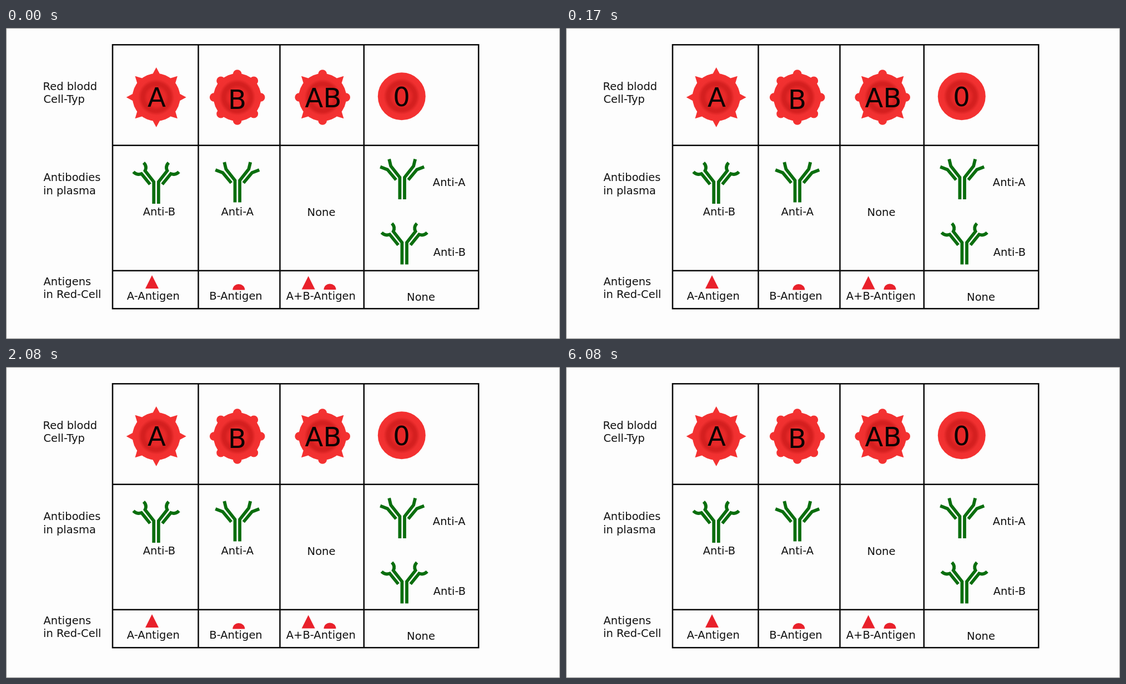
Write an HTML page that moves like this. It is 998 px wide and 561 px high and loops after 8000 ms.

```html
<!DOCTYPE html>
<html lang="en">
<head>
<meta charset="utf-8">
<title>Blood types</title>
<style>
  html, body { margin: 0; width: 100%; height: 100%; overflow: hidden; background: #fdfdfd; }
  svg { display: block; width: 100%; height: 100%; }
  text { font: 19.5px "DejaVu Sans", sans-serif; fill: #111; }
  .mid text { text-anchor: middle; }
  .big text { font-size: 48px; text-anchor: middle; fill: #080404; }
  .grid { fill: none; stroke: #080808; stroke-width: 2.5; }
  .chain { fill: none; stroke: #0a6e0e; stroke-width: 5.8; }
  .antigen { fill: #e9212b; }
  .knob { fill: #f43131; }
</style>
</head>
<body>
<svg viewBox="0 0 998 561">
  <defs>
    <radialGradient id="blood">
      <stop offset="0" stop-color="#e62828"/>
      <stop offset=".36" stop-color="#e82929"/>
      <stop offset=".52" stop-color="#d41f1f"/>
      <stop offset=".62" stop-color="#d62020"/>
      <stop offset=".76" stop-color="#f03030"/>
      <stop offset="1" stop-color="#f43131"/>
    </radialGradient>
    <circle id="cell" r="43" fill="url(#blood)"/>
    <path id="spike" class="knob" d="M-7-41 0-54 7-41Z"/>
    <circle id="bump" class="knob" cy="-42" r="7.8"/>
    <g id="spikes">
      <use href="#spike"/><use href="#spike" transform="rotate(90)"/>
      <use href="#spike" transform="rotate(180)"/><use href="#spike" transform="rotate(270)"/>
    </g>
    <g id="bumps">
      <use href="#bump"/><use href="#bump" transform="rotate(90)"/>
      <use href="#bump" transform="rotate(180)"/><use href="#bump" transform="rotate(270)"/>
    </g>

    <!-- Antibodies: origin at the fork, one half mirrored -->
    <path id="halfA" class="chain" d="M-4.3 39.5V0L-20.5-20.5-23.5-33M-11 4.5-26.5-14-39.5-19"/>
    <path id="halfB" class="chain" d="M-4.3 39.5V0L-20-20Q-16-28-22.5-34.5M-11 4.5-26.5-14.5Q-35-11.5-41-18"/>
    <g id="antiA"><use href="#halfA"/><use href="#halfA" transform="scale(-1 1)"/></g>
    <g id="antiB"><use href="#halfB"/><use href="#halfB" transform="scale(-1 1)"/></g>

    <path id="triangle" class="antigen" d="M0-24 12 0H-12Z"/>
    <path id="dome" class="antigen" d="M-11 0A11 10.5 0 0 1 11 0Z"/>
  </defs>

  <rect width="998" height="561" fill="#fdfdfd"/>
  <rect x=".5" y=".5" width="997" height="560" fill="none" stroke="#858585"/>
  <path class="grid" d="M192 30.3H851.3V506.3H192ZM346.5 30V506M493.5 30V506M644.8 30V506M192 211.8H851M192 437.7H851"/>

  <g>
    <text x="66.5" y="111.5">Red blodd</text>
    <text x="67.5" y="135">Cell-Typ</text>
    <text x="67.5" y="276">Antibodies</text>
    <text x="67" y="299.5">in plasma</text>
    <text x="67.5" y="463.5">Antigens</text>
    <text x="67" y="487">in Red-Cell</text>
  </g>

  <g transform="translate(270.7 125)">
    <use href="#spikes"/><use href="#spikes" transform="rotate(45)"/><use href="#cell"/>
  </g>
  <g transform="translate(416.7 125)">
    <use href="#bumps"/><use href="#bumps" transform="rotate(45)"/><use href="#cell"/>
  </g>
  <g transform="translate(570.2 125)">
    <use href="#bumps"/><use href="#spikes" transform="rotate(45)"/><use href="#cell"/>
  </g>
  <use href="#cell" x="712.8" y="123.3"/>
  <g class="big">
    <text x="271.5" y="141.5">A</text>
    <text x="416.5" y="146">B</text>
    <text x="571.5" y="142.5">AB</text>
    <text x="712.5" y="141">0</text>
  </g>

  <use href="#antiB" x="270.5" y="277.5"/>
  <use href="#antiA" x="416.8" y="275"/>
  <use href="#antiA" x="713.7" y="269.5"/>
  <use href="#antiB" x="717.7" y="387"/>

  <use href="#triangle" x="263" y="470"/>
  <use href="#dome" x="419.3" y="472.5"/>
  <use href="#triangle" x="544.7" y="471.5"/>
  <use href="#dome" x="583.5" y="472"/>

  <g class="mid">
    <text x="276" y="338">Anti-B</text>
    <text x="416.8" y="338">Anti-A</text>
    <text x="568" y="339">None</text>
    <text x="798.2" y="284.5">Anti-A</text>
    <text x="799" y="410.5">Anti-B</text>
    <text x="265.3" y="490">A-Antigen</text>
    <text x="414" y="490">B-Antigen</text>
    <text x="567.3" y="490">A+B-Antigen</text>
    <text x="747.5" y="492">None</text>
  </g>
</svg>
</body>
</html>
```
